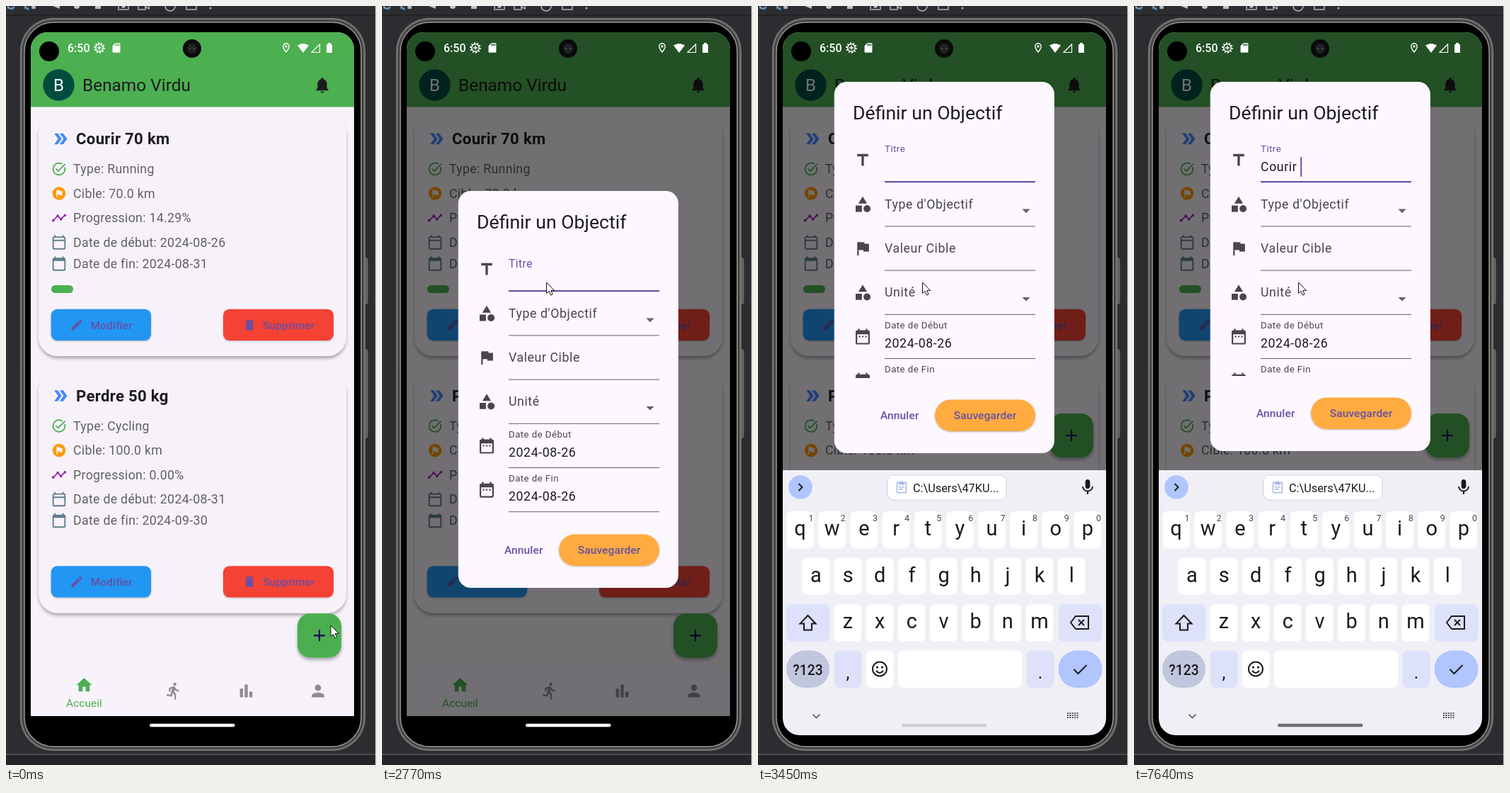
These frames come from a looping animation (523 by 1071 pixels, 8000 ms). An HTML page:

```html
<!DOCTYPE html>
<html lang="fr">
<head>
<meta charset="utf-8">
<title>Objectifs</title>
<style>
html, body { margin: 0; width: 100%; height: 100%; overflow: hidden; background: #2b2d30; }
svg { display: block; width: 523px; height: 1071px; font-family: Roboto, sans-serif; }
text { white-space: pre; }
</style>
</head>
<body>
<svg id="stage" viewBox="0 0 523 1071"></svg>
<script>
const ICONS = {
  arrows: 'M15.5 5H11l5 7-5 7h4.5l5-7zM8.5 5H4l5 7-5 7h4.5l5-7z',
  done: 'M22 5.18L10.59 16.6l-4.24-4.24 1.41-1.41 2.83 2.83 10-10L22 5.18zm-2.21 5.04c.13.57.21 1.17.21 1.78 0 4.42-3.58 8-8 8s-8-3.58-8-8 3.58-8 8-8c1.58 0 3.04.46 4.28 1.25l1.44-1.44C16.1 2.67 14.13 2 12 2 6.48 2 2 6.48 2 12s4.48 10 10 10 10-4.48 10-10c0-1.19-.22-2.33-.6-3.39l-1.61 1.61z',
  goal: 'M12 2a10 10 0 100 20 10 10 0 000-20zM8 7h5l.6 1.5H17V15h-4l-.6-1.5H9.5V18H8z',
  trend: 'M23 8c0 1.1-.9 2-2 2-.18 0-.35-.02-.51-.07l-3.56 3.55c.05.16.07.34.07.52 0 1.1-.9 2-2 2s-2-.9-2-2c0-.18.02-.36.07-.52l-2.55-2.55c-.16.05-.34.07-.52.07s-.36-.02-.52-.07l-4.55 4.56c.05.16.07.33.07.51 0 1.1-.9 2-2 2s-2-.9-2-2 .9-2 2-2c.18 0 .35.02.51.07l4.56-4.55C8.02 9.36 8 9.18 8 9c0-1.1.9-2 2-2s2 .9 2 2c0 .18-.02.36-.07.52l2.55 2.55c.16-.05.34-.07.52-.07s.36.02.52.07l3.55-3.56C19.02 8.35 19 8.18 19 8c0-1.1.9-2 2-2s2 .9 2 2z',
  dayStart: 'M20 3h-1V1h-2v2H7V1H5v2H4c-1.1 0-2 .9-2 2v16c0 1.1.9 2 2 2h16c1.1 0 2-.9 2-2V5c0-1.1-.9-2-2-2zm0 18H4V10h16v11zm0-13H4V5h16v3z',
  dayEnd: 'M20 3h-1V1h-2v2H7V1H5v2H4c-1.1 0-2 .9-2 2v16c0 1.1.9 2 2 2h16c1.1 0 2-.9 2-2V5c0-1.1-.9-2-2-2zm0 18H4V8h16v13z',
  edit: 'M3 17.25V21h3.75L17.81 9.94l-3.75-3.75L3 17.25zM20.71 7.04c.39-.39.39-1.02 0-1.41l-2.34-2.34a1 1 0 00-1.41 0l-1.83 1.83 3.75 3.75 1.83-1.83z',
  bin: 'M6 19c0 1.1.9 2 2 2h8c1.1 0 2-.9 2-2V7H6v12zM19 4h-3.5l-1-1h-5l-1 1H5v2h14V4z',
  bell: 'M12 22c1.1 0 2-.9 2-2h-4c0 1.1.89 2 2 2zm6-6v-5c0-3.07-1.64-5.64-4.5-6.32V4c0-.83-.67-1.5-1.5-1.5s-1.5.67-1.5 1.5v.68C7.63 5.36 6 7.92 6 11v5l-2 2v1h16v-1l-2-2z',
  home: 'M10 20v-6h4v6h5v-8h3L12 3 2 12h3v8z',
  run: 'M13.49 5.48c1.1 0 2-.9 2-2s-.9-2-2-2-2 .9-2 2 .9 2 2 2zm-3.6 13.9l1-4.4 2.1 2v6h2v-7.5l-2.1-2 .6-3c1.3 1.5 3.3 2.5 5.5 2.5v-2c-1.9 0-3.5-1-4.3-2.4l-1-1.6c-.4-.6-1-1-1.7-1-.3 0-.5.1-.8.1l-5.2 2.2v4.7h2v-3.4l1.8-.7-1.6 8.1-4.9-1-.4 2 7 1.4z',
  bars: 'M4 9h4v11H4zM16 13h4v7h-4zM10 4h4v16h-4z',
  person: 'M12 12a4 4 0 100-8 4 4 0 000 8zm0 2c-2.67 0-8 1.34-8 4v2h16v-2c0-2.66-5.33-4-8-4z',
  title: 'M5 4v3h5.5v12h3V7H19V4z',
  shapes: 'M12 2l-5.5 9h11zM17.5 13a4.5 4.5 0 100 9 4.5 4.5 0 000-9zM3 13.5h8v8H3z',
  flag: 'M14.4 6L14 4H5v17h2v-7h5.6l.4 2h7V6z',
  date: 'M9 11H7v2h2zm4 0h-2v2h2zm4 0h-2v2h2zm2-7h-1V2h-2v2H8V2H6v2H5c-1.1 0-2 .9-2 2v14c0 1.1.9 2 2 2h14c1.1 0 2-.9 2-2V6c0-1.1-.9-2-2-2zm0 16H5V9h14v11z',
  drop: 'M7 9.5l5 5 5-5z',
  pin: 'M12 2a7 7 0 00-7 7c0 5.25 7 13 7 13s7-7.75 7-13a7 7 0 00-7-7zm0 2a5 5 0 015 5c0 2.9-2.9 7.2-5 9.9C9.9 16.2 7 11.9 7 9a5 5 0 015-5zm0 2.5a2.5 2.5 0 100 5 2.5 2.5 0 000-5z',
  card: 'M18 2h-8L4 8v12c0 1.1.9 2 2 2h12c1.1 0 2-.9 2-2V4c0-1.1-.9-2-2-2zm-6 6h-2V4h2zm3 0h-2V4h2zm3 0h-2V4h2z',
  mic: 'M12 14c1.66 0 3-1.34 3-3V5c0-1.66-1.34-3-3-3S9 3.34 9 5v6c0 1.66 1.34 3 3 3zm5.3-3c0 3-2.54 5.1-5.3 5.1S6.7 14 6.7 11H5c0 3.41 2.72 6.23 6 6.72V21h2v-3.28c3.28-.48 6-3.3 6-6.72z',
  paste: 'M19 2h-4.2a3 3 0 00-5.6 0H5c-1.1 0-2 .9-2 2v16c0 1.1.9 2 2 2h14c1.1 0 2-.9 2-2V4c0-1.1-.9-2-2-2zm0 18H5V4h2v3h10V4h2zM7 10h10v2H7zm0 4h7v2H7z'
};
const UNIT = 1.111, INK = '#1d1b20', MUTED = '#49454f', PRIMARY = '#6750a4', GREEN = '#4caf50', PAGE = '#f7f2fa';

const icon = (name, x, y, scale, fill) =>
  `<path d="${ICONS[name]}" fill="${fill}" fill-rule="evenodd" transform="translate(${x - 12 * scale} ${y - 12 * scale}) scale(${scale})"/>`;
const text = (x, y, str, size, fill, extra = '') =>
  `<text x="${x}" y="${y}" font-size="${size}" fill="${fill}" ${extra}>${str}</text>`;
const rect = (x, y, w, h, r, fill, extra = '') =>
  `<rect x="${x}" y="${y}" width="${w}" height="${h}" rx="${r}" fill="${fill}" ${extra}/>`;
const line = (d, color, width, extra = '') =>
  `<path d="${d}" fill="none" stroke="${color}" stroke-width="${width}" ${extra}/>`;
const MID = 'text-anchor="middle"', MEDIUM = 'font-weight="500" letter-spacing=".11"';

function goalCard(dy, name, rows, progress) {
  const looks = [['done', GREEN], ['goal', '#ff9800'], ['trend', '#9c27b0'], ['dayStart', '#607d8b'], ['dayEnd', '#607d8b']];
  const ys = [230, 264.5, 299, 333.5, 363.5];
  return `<g transform="translate(0 ${dy})">
    ${rect(46, 154, 435, 340, 27, PAGE, 'filter="url(#deep)"')}
    ${icon('arrows', 77, 187.5, UNIT, '#448aff')}
    ${text(99, 195, name, 22.2, INK, 'font-weight="700" letter-spacing=".28"')}
    ${rows.map((row, i) => icon(looks[i][0], 75, ys[i], .926, looks[i][1]) +
      text(95, ys[i] + 6.3, row, 17.8, '#616161', 'letter-spacing=".28"')).join('')}
    ${progress ? rect(64, 394, progress, 11, 5.5, GREEN) : ''}
    ${rect(63.7, 427.7, 141.3, 44.4, 9, '#2196f3', 'filter="url(#soft)"')}
    ${icon('edit', 100, 450, .833, PRIMARY)}${text(119.5, 455.5, 'Modifier', 15.55, PRIMARY, MEDIUM)}
    ${rect(307, 427.7, 156, 44.4, 9, '#f44336', 'filter="url(#soft)"')}
    ${icon('bin', 344, 450, .833, PRIMARY)}${text(363, 455.5, 'Supprimer', 15.55, PRIMARY, MEDIUM)}
  </g>`;
}

function ideAndPhone() {
  const sideKey = (y, h) => rect(503, y, 8, h, 2, '#5a5a58', 'stroke="#7c7c79"');
  return rect(0, 0, 523, 1071, 0, '#2b2d30') + rect(0, 12, 523, 1.5, 0, '#1e1f22') +
    rect(0, 1055, 523, 2, 0, '#4a4c50') + rect(0, 1057, 523, 14, 0, '#242528') + rect(522, 0, 1, 1071, 0, '#c8c8c8') +
    line('M3 0v3h8V0M27 0v3h5', '#b0b3b8', 1.5) + line('M6 5q4 0 5-5M28 0q0 5 5 5', '#3d8fd1', 1.5) +
    rect(36, 0, 6, 4, 1, '#b0b3b8') + `<path d="M66 0l10 4V0z" fill="#c4c6ca"/>` +
    `<circle cx="100" cy="0" r="4" fill="#c4c6ca"/>` + rect(126, 0, 8, 4, 0, '#c4c6ca') +
    line('M159 0v5h14V0M187 0v5h10V0m0 1l5 3V0M225 0a7 7 0 0014 0M255 0v5h14V0', '#b0b3b8', 1.5) +
    `<circle cx="166" cy="0" r="3" fill="#b0b3b8"/><circle cx="289" cy="3" r="1.5" fill="#b0b3b8"/>` +
    sideKey(356, 64) + sideKey(485, 124) +
    rect(20.5, 17.5, 487, 1033, 46, '#666663', 'stroke="#858582"') +
    rect(23.5, 20.5, 481, 1027, 43, '#454543', 'stroke="#3a3a38"') +
    rect(26, 23, 476, 1022, 41, '#000', 'stroke="#969692" stroke-width="1.5"');
}

function homePage() {
  return rect(35, 37, 457, 966, 0, PAGE) + rect(35, 37, 457, 105.5, 0, GREEN) +
    `<circle cx="74.5" cy="111.5" r="22.2" fill="#004d40"/>` +
    text(74.5, 120, 'B', 24, '#fff', MID) + text(108, 120, 'Benamo Virdu', 24.4, INK) +
    icon('bell', 447, 111.5, UNIT, INK) +
    goalCard(0, 'Courir 70 km', ['Type: Running', 'Cible: 70.0 km', 'Progression: 14.29%', 'Date de début: 2024-08-26', 'Date de fin: 2024-08-31'], 31) +
    goalCard(362.5, 'Perdre 50 kg', ['Type: Cycling', 'Cible: 100.0 km', 'Progression: 0.00%', 'Date de début: 2024-08-31', 'Date de fin: 2024-09-30'], 0) +
    rect(35, 937, 457, 65, 0, '#f8f3fb') + rect(35, 936, 457, 1, 0, '#f1ebf4') +
    icon('home', 110.5, 958.3, UNIT, GREEN) + text(110.5, 988.7, 'Accueil', 15.55, GREEN, MID) +
    ['run', 'bars', 'person'].map((name, i) => icon(name, [237, 339.5, 441][i], 966.5, UNIT, '#8f8c93')).join('') +
    `<g id="fab">${rect(-31.1, -31.1, 62.2, 62.2, 17.8, GREEN, 'filter="url(#deep)"')}${line('M-8 0H8M0-8V8', '#21005d', 2.2)}</g>`;
}

function statusBar() {
  return text(87, 64.7, '6:50', 16, '#fff', 'font-weight="500"') +
    `<circle cx="132" cy="59" r="5.2" fill="none" stroke="#fff" stroke-width="1.5"/>
     <circle cx="132" cy="59" r="6.8" fill="none" stroke="#fff" stroke-width="2" stroke-dasharray="2 2.27"/>` +
    line('M129 59h6M132 56v6', '#fff', 1.3) + icon('card', 156, 59, .68, '#fff') + icon('pin', 396, 59, .7, '#fff') +
    `<path d="M412 55.5q8-5 16 0L420 66z" fill="#fff"/><path d="M453 54h2v-2h4v2h2v12h-8z" fill="#fff"/>` +
    line('M443.5 54v11.5H432z', '#fff', 1.2) +
    `<circle cx="61" cy="64" r="14" fill="#000"/><circle cx="263" cy="60" r="13" fill="#0b0b0c"/>
     <circle cx="263" cy="60" r="7" fill="#202123"/><circle cx="260" cy="60" r="1.3" fill="#4a4c52"/><circle cx="266" cy="60" r="1.3" fill="#4a4c52"/>`;
}

function dialog() {
  const fields = [['title', 'Titre'], ['shapes', "Type d'Objectif"], ['flag', 'Valeur Cible'], ['shapes', 'Unité'],
    ['date', 'Date de Début', '2024-08-26'], ['date', 'Date de Fin', '2024-08-26']];
  const body = fields.map(([glyph, label, value], i) => {
    const y = 141.7 + 62.2 * i;
    return icon(glyph, 148, y - 31, UNIT, MUTED) +
      (value ? text(179, y - 42.5, label, 13.3, MUTED, 'letter-spacing=".417"') + text(179, y - 16, value, 17.8, INK, 'letter-spacing=".556"')
        : text(179, y - 25, label, 17.8, MUTED, `letter-spacing=".556" ${i ? '' : 'id="label"'}`)) +
      (i === 1 || i === 3 ? icon('drop', 379, y - 21.5, UNIT, '#65616b') : '') +
      rect(179, y - .5, 213, 1, 0, '#625e67', i ? '' : 'id="focusLine"');
  }).join('');
  return `<g id="dialog">${rect(107.8, 0, 311.1, 560, 17.5, '#fdf7ff', 'id="panel"')}
    ${text(134, 53.3, 'Définir un Objectif', 26.67, INK)}
    <g clip-path="url(#bodyClip)">${body}${text(179, 125.7, '', 17.8, INK, 'id="typed" letter-spacing=".556"')}
    ${rect(179, 127.6, 0, 1.3, 0, INK, 'id="composing"')}${rect(179, 106, 2, 28, 1, PRIMARY, 'id="caret"')}</g>
    <g id="actions">${text(173, 5.5, 'Annuler', 15.55, PRIMARY, MEDIUM)}
    ${rect(250, -22.2, 142, 44.4, 22.2, '#ffab40', 'filter="url(#soft)"')}
    ${text(321, 5.5, 'Sauvegarder', 15.55, PRIMARY, MEDIUM + MID)}</g></g>`;
}

function keyboard() {
  const PITCH = 45.15, TINT = '#dde1f9', ACCENT = '#b1c5ff', GLYPH = '#1b1b1f';
  const key = (x, y, w, fill = '#fff', r = 7) => rect(x, y, w, 52.5, r, fill);
  const row = (letters, first, y) => [...letters].map((letter, i) => {
    const x = first + PITCH * i;
    return key(x - 19.3, y, 38.6) + text(x, y + 34.2, letter, 29, GLYPH, MID) +
      (letters.length > 9 ? text(x + 15.5, y + 13.5, (i + 1) % 10, 12.5, '#45464f', MID) : '');
  }).join('');
  const dots = [0, 1, 2].map(i => line(`M437 ${343 + i * 3}h16`, '#55565c', 1.8, 'stroke-dasharray="2 1.4"')).join('');
  return `<g id="keyboard">${rect(35, 0, 457, 420, 0, '#f0eff5')}
    <circle cx="60" cy="24" r="16.8" fill="${ACCENT}"/>${line('M57.5 19l5 5-5 5', GLYPH, 2)}
    <g id="chip">${rect(-84, -17.5, 168, 35, 9, '#fff', 'stroke="#d3d3dc"')}${icon('paste', -64, 0, .8, '#a9bbea')}
    ${text(-48, 6, 'C:\\Users\\47KU...', 16.3, GLYPH)}</g>${icon('mic', 466, 24, UNIT, GLYPH)}
    ${row('qwertyuiop', 59.6, 58)}${row('asdfghjkl', 82, 123.5)}${row('zxcvbnm', 127, 189)}
    ${key(40, 189, 61, TINT)}${line('M70.5 205l-11 11.5h5.5v9h11v-9h5.5z', GLYPH, 2)}
    ${key(425, 189, 61.5, TINT)}${line('M442 215l7-9h18v18h-18zM453 211l8 8m0-8l-8 8', GLYPH, 2)}
    ${key(40, 254.5, 61, '#c0c6dc', 26)}${text(70.5, 288.7, '?123', 19.3, GLYPH, MID + ' font-weight="500"')}
    ${key(108, 254.5, 38.5, TINT)}${text(127, 294, ',', 25, GLYPH, MID)}
    ${key(153, 254.5, 38.5)}<circle cx="172" cy="280.5" r="10" fill="none" stroke="${GLYPH}" stroke-width="2"/>
    <circle cx="168.5" cy="278" r="1.5"/><circle cx="175.5" cy="278" r="1.5"/>${line('M167 283q5 6 10 0', GLYPH, 2)}
    ${key(198, 254.5, 175)}${key(380, 254.5, 38.5, TINT)}${text(399, 294, '.', 25, GLYPH, MID)}
    ${key(424.5, 254.5, 62, ACCENT, 26)}${line('M446.5 281l6 6 12-12', GLYPH, 2)}
    ${line('M77.5 344.5l5 5 5-5', '#55565c', 1.6)}${dots}</g>`;
}

document.getElementById('stage').innerHTML = `<defs>
  <filter id="deep" x="-20%" y="-20%" width="140%" height="150%"><feDropShadow dx="0" dy="3.5" stdDeviation="2.2" flood-opacity=".3"/></filter>
  <filter id="soft" x="-20%" y="-20%" width="140%" height="150%"><feDropShadow dx="0" dy="1" stdDeviation="1" flood-opacity=".28"/></filter>
  <clipPath id="screenClip">${rect(35, 37, 457, 992, 24, '#000')}</clipPath>
  <clipPath id="bodyClip">${rect(108, 60, 311, 394, 0, '#000', 'id="bodyBox"')}</clipPath></defs>
  ${ideAndPhone()}<g clip-path="url(#screenClip)">${homePage()}
  ${rect(35, 37, 457, 966, 0, '#000', 'id="scrim" opacity=".54"')}${statusBar()}${dialog()}
  ${rect(35, 1002, 457, 27, 0, '#000')}${keyboard()}${rect(203, 1012.7, 120.5, 4.5, 2.2, '#fff', 'id="pill"')}</g>
  <path id="mouse" d="M0 0v15.5l3.6-3.2 2.4 5.7 2.6-1.1-2.4-5.5h5z" fill="#fff" stroke="#111"/>`;

const parts = Object.fromEntries([...document.querySelectorAll('[id]')].map(el => [el.id, el]));
const set = (id, attrs) => { for (const name in attrs) parts[id].setAttribute(name, attrs[name]); };
const show = (id, on) => set(id, { visibility: on ? 'visible' : 'hidden' });

// Each track holds [start time, ...values]; values stay until the next start.
const tracks = {
  mouse: [[0, 459, 874], [300, 448, 880], [450, 445, 882], [720, 444, 882], [1180, 443, 882], [1580, 330, 600], [1700, 253, 451],
    [1850, 248, 437], [1970, 242, 418], [2090, 236, 400], [2210, 232.5, 390]],
  keyboard: [[0, 1100, .555], [3170, 868, .555], [3320, 672, 1], [3450, 655, 1]],
  dialog: [[0, 261, 560], [3320, 113, 535], [3450, 107, 524], [3570, 107, 521]],
  focus: [[0, 0], [2770, .5], [2890, 1]],
  typed: [[0, ''], [4410, 'C'], [4530, 'Co'], [4980, 'Cou'], [5130, 'Couri'], [5400, 'Courir'], [7640, 'Courir ']],
  composing: [[0, 0], [4680, 1], [4980, 0], [5250, 1], [5400, 0], [5530, 1], [7640, 0]],
  caret: [[0, 0], [3720, 1], [4140, 0], [4410, 1], [6090, 0], [6550, 1], [7080, 0], [7640, 1]],
  pill: [[0, '#fff'], [3320, '#e0dfe4'], [3450, '#cfced3'], [3720, '#b6b5ba'], [3990, '#9a999e'], [4410, '#868589'], [4980, '#6f6e73']]
};
const at = (name, t) => tracks[name].findLast(step => step[0] <= t).slice(1);

function draw(t) {
  const [kbTop, chipScale] = at('keyboard', t), [top, height] = at('dialog', t);
  const [focus] = at('focus', t), [typed] = at('typed', t);
  const open = t >= 1180, [mx, my] = at('mouse', t);
  set('mouse', { transform: `translate(${mx} ${my})` });
  set('fab', { transform: `translate(443 ${Math.min(888.3, kbTop - 49)})` });
  set('keyboard', { transform: `translate(0 ${kbTop})` });
  set('chip', { transform: `translate(267 24.5) scale(${chipScale})` });
  set('pill', { fill: at('pill', t)[0] });
  for (const id of ['scrim', 'dialog']) set(id, { display: open ? 'inline' : 'none' });
  set('dialog', { transform: `translate(0 ${top})` });
  set('panel', { height });
  set('bodyBox', { height: height - 166 });
  set('actions', { transform: `translate(0 ${height - 53.3})` });
  const scale = 1 - focus / 4;
  set('label', { y: 116.7 - 17.5 * focus, 'font-size': 17.8 * scale, 'letter-spacing': .556 * scale, fill: focus ? PRIMARY : MUTED });
  set('focusLine', { y: focus ? 140 : 141.2, height: focus ? 2.2 : 1, fill: focus ? PRIMARY : '#625e67' });
  parts.typed.textContent = typed;
  const width = typed && open ? parts.typed.getComputedTextLength() : 0;
  set('caret', { x: 179 + width });
  show('caret', at('caret', t)[0]);
  set('composing', { width });
  show('composing', at('composing', t)[0]);
}

function tick() {
  draw(performance.now() % 8000);
  requestAnimationFrame(tick);
}
tick();
</script>
</body>
</html>
```
